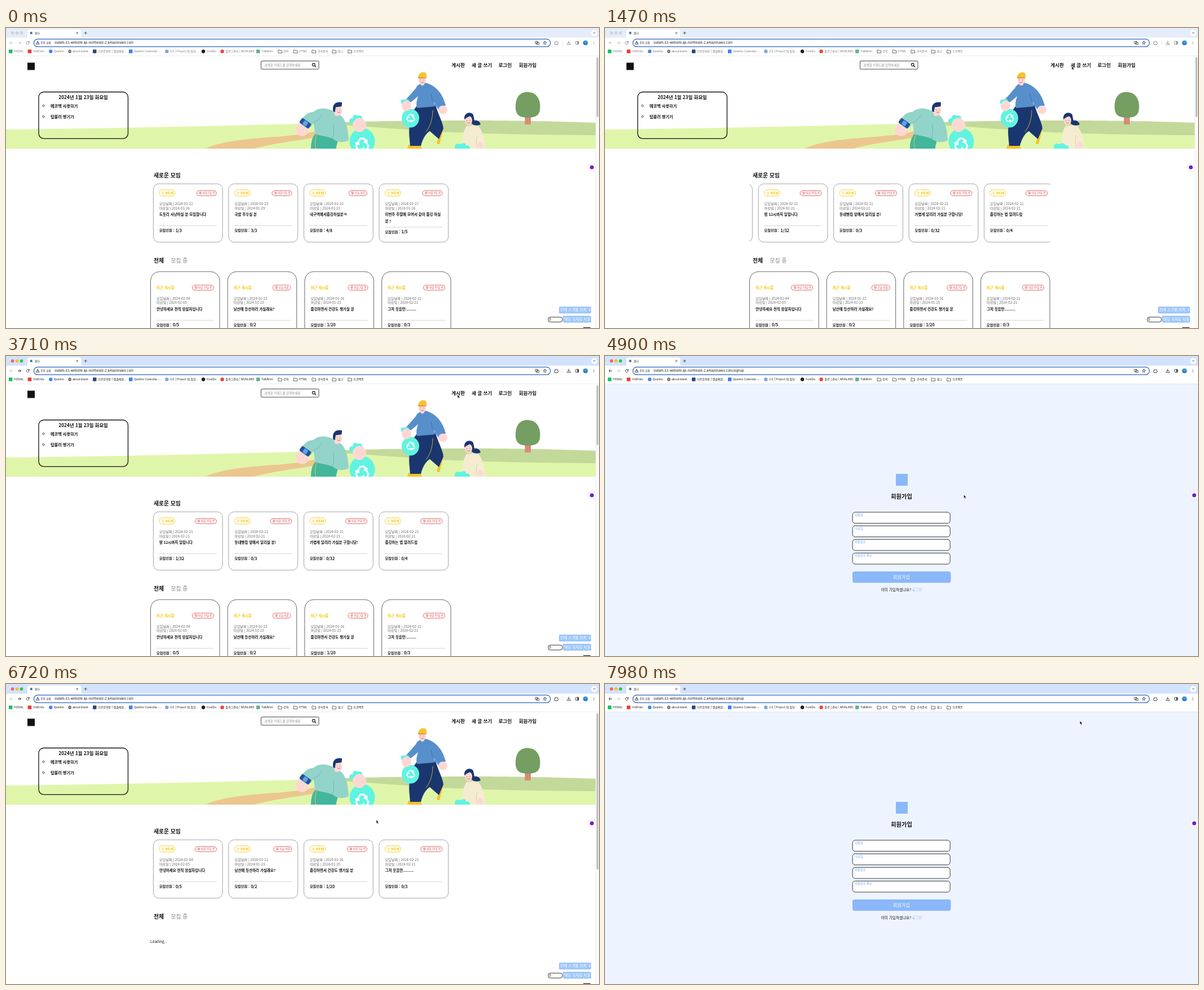
An HTML page for the animation above (8 s loop, 1052 by 532 pixels).

```html
<!DOCTYPE html>
<html lang="ko">
<head>
<meta charset="utf-8">
<title>줍다</title>
<style>
html, body { margin: 0; width: 100%; height: 100%; overflow: hidden; background: #fff; }
svg { display: block; width: 100vw; height: 100vh; }
text { font-family: "Noto Sans CJK KR", "Noto Sans CJK JP", "Noto Sans CJK", sans-serif; white-space: pre; }
text.ui { font-family: Inter, "Noto Sans CJK KR", "Noto Sans CJK JP", "Noto Sans CJK", sans-serif; }
</style>
</head>
<body>
<svg id="stage" viewBox="0 0 1052 532" xmlns="http://www.w3.org/2000/svg"></svg>
<script>
const LOOP = 8000, STEP = 70;
const YELLOW = '#f6c915', RED = '#d8403f', SKY = '#8ab8f8', CYAN = '#61f3e1', SKIN = '#fdd8d3', NAVY = '#1a366f';

// ---- markup helpers; text is placed by its vertical middle
const text = (x, y, s, size, fill = '#111', weight = 400, extra = '') =>
  `<text x="${x}" y="${y + size * 0.365}" font-size="${size}" fill="${fill}" font-weight="${weight}" ${extra}>${s}</text>`;
const ui = (x, y, s, size, fill) => text(x, y, s, size, fill, 400, 'class="ui"');
const rect = (x, y, w, h, r, fill, stroke = 'none', sw = 1) =>
  `<rect x="${x}" y="${y}" width="${w}" height="${h}" rx="${r}" fill="${fill}" stroke="${stroke}" stroke-width="${sw}"/>`;
const dot = (x, y, r, fill, extra = '') => `<circle cx="${x}" cy="${y}" r="${r}" fill="${fill}" ${extra}/>`;
const oval = (x, y, rx, ry, fill) => `<ellipse cx="${x}" cy="${y}" rx="${rx}" ry="${ry}" fill="${fill}"/>`;
const shape = (d, fill) => `<path d="${d}" fill="${fill}"/>`;
const line = (d, stroke = '#222', w = 0.9, extra = '') =>
  `<path d="${d}" fill="none" stroke="${stroke}" stroke-width="${w}" stroke-linecap="round" stroke-linejoin="round" ${extra}/>`;
const group = (inner, attrs = '') => `<g ${attrs}>${inner}</g>`;

// ---- meeting cards: deadline, meeting date, closing date, title lines, people
const FEB = ['마감 29일 전', '2024-02-21', '2024-02-21'];
const recent = [
  ['마감 13일 전', '2024-02-04', '2024-02-05', '안녕하세요 전직 암살자입니다', '0/5'],
  ['오늘 마감', '2024-01-22', '2024-01-23', '남산에 등산하러 가실래요?', '0/2'],
  ['마감 2일 전', '2024-01-26', '2024-01-25', '줍깅하면서 건강도 챙기실 분', '1/20'],
  [...FEB, '그저 웃음만.........', '0/3']
];
const fresh = [
  ['마감 2일 전', '2024-01-22', '2024-01-26', '도토리 사냥하실 분 모집합니다', '1/3'],
  ['마감 6일 전', '2024-01-25', '2024-01-29', '국밥 주우실 분', '3/3'],
  ['오늘 마감', '2024-01-23', '2024-01-23', '내구역에서줍깅하실분ㅋ', '4/8'],
  ['마감 3일 전', '2024-01-27', '2024-01-26', '이번주 주말에 모여서 같이 줍깅 하실|분 !', '1/5'],
  [...FEB, '밤 12시까지 달립니다', '1/32'],
  [...FEB, '동네빵집 앞에서 달리실 분!', '0/3'],
  [...FEB, '가볍게 달리러 가실분 구합니당!', '0/32'],
  [...FEB, '줍깅하는 법 알려드림', '0/4']
];
const pillWidth = { 5: 32, 7: 35, 8: 38 };

function cardBody([due, date, close, title, people]) {
  const w = pillWidth[due.length], left = 112 - w;
  const lines = title.split('|'), drop = lines.length > 1 ? 2.5 : 0;
  return rect(left, 12, w, 9, 4.5, '#fff', RED, 0.8) +
    dot(left + 6.5, 16.7, 1.5, 'none', `stroke="${RED}" stroke-width=".9"`) +
    line(`M${left + 4.6} 14.6l.8 -.7M${left + 8.4} 14.6l-.8 -.7`, RED, 0.7) +
    text(left + 10.3, 16.5, due, 4.65, RED, 500) +
    text(10.5, 35.3, '모임날짜 | ' + date, 6.2, '#666') +
    text(10.5, 43, '마감일 | ' + close, 6.2, '#666') +
    lines.map((s, i) => text(10.5, 54.8 + i * 11.2, s, 6.5, '#111', 700)).join('') +
    line(`M10.5 ${74.3 + drop}H112`, '#c9c9c9', 0.8) +
    text(10.5, 82.7 + drop, '모집인원 :', 6.2, '#111', 700) +
    text(39.5, 82.7 + drop, people, 7, '#111', 700);
}

const newPill = rect(10.5, 10.7, 28, 11, 5.5, '#fff', YELLOW, 0.9) +
  dot(16.8, 15.6, 1.6, 'none', `stroke="${YELLOW}" stroke-width=".7"`) +
  line('M16.2 18.3h1.2', YELLOW, 0.8) + text(21.2, 16.3, 'NEW', 6.5, YELLOW, 700);
const newCard = (c, i) => group(
  rect(0, 0, 122.8, 103.5, 10, '#fff', '#a3a3a3') + newPill + cardBody(c),
  `transform="translate(${261.4 + i * 133.5} 276.3)"`);
const recentCard = (c, i) => group(
  rect(0, -12, 122.5, 140, 16, '#fff', '#666') + text(10.5, 16.3, '최근 게시물', 6.5, YELLOW, 700) + cardBody(c),
  `transform="translate(${256.5 + i * 136.7} 444)"`);

// ---- illustration
const recycle = (x, y, k) => group([0, 120, 240].map(a => group(
  line('M-4.6 -.2L-1.4 -5H1.4L2.8 -2.8', '#fff', 1.3) + shape('M4.3 -4.4L4 -.6L.6 -2.2Z', '#fff'),
  `transform="rotate(${a})"`)).join(''), `transform="translate(${x} ${y}) scale(${k})"`);
const face = (x, y) => dot(x - 2.5, y, 0.6, '#333') + dot(x + 3, y, 0.6, '#333') +
  line(`M${x - 2} ${y + 4}q2.5 2.2 4.5 0`, '#c0392b', 0.8);
const knot = points => points.map(([x, y, r]) => dot(x, y, r, CYAN)).join('');

const hills = shape('M440 176C560 165 700 164 830 164C920 164 990 166 1046 168V214H440Z', '#c3d99a') +
  shape('M0 180C180 178 360 174 520 170C620 170 720 184 850 187C920 189 990 190 1046 190V214H0Z', '#dff6aa') +
  shape('M353 214C395 196 450 196 500 191C522 189 540 186 556 181L566 191C540 197 480 203 440 214Z', '#ecc68f');
const tree = rect(920.5, 154, 10.5, 17, 0, '#d98a76') +
  shape('M904 140C904 122 912 113.5 925 113.5C938 113.5 947.5 122 947.5 140C947.5 153 942 159 926 159C910 159 904 153 904 140Z', '#759e62');
const bender =
  shape('M541 214C541 196 547 184 560 183L588 191C591 201 585 208 586 214Z', '#43b69c') +
  line('M550 214C547 204 548 196 552 188', '#e7c65a', 1) +
  shape('M545 149C556 140 570 141 584 149C600 155 607 172 608 199C596 205 587 202 579 196C570 192 560 192 549 188C546 180 548 174 545 168L540 177L524 163C529 155 536 149 545 149Z', '#92d4c9') +
  line('M545 168C552 165 557 160 560 155M579 196C582 186 582 178 580 170', '#5faea2', 0.7) +
  oval(525.5, 180, 11.5, 11.5, SKIN) +
  group(rect(-10, -5, 20, 10, 2, '#24509b') + rect(-4, -4, 8, 8, 2, '#58a7e8'), 'transform="translate(531 169) rotate(35)"') +
  rect(583, 147, 9, 9, 3, SKIN) + oval(588.8, 146, 7.6, 9.5, SKIN) +
  shape('M580.5 148C578 135 585 130 596 132L595.5 139L585 140.5L583.5 149Z', NAVY) + face(590, 145) +
  knot([[614, 165, 5], [620, 159, 5], [627, 160, 5]]) + oval(632, 201, 22.5, 23.5, CYAN) +
  oval(627, 172, 12, 12.5, SKIN) + recycle(632, 207, 2.2);
const walker =
  shape('M771 177L776 180L769 206L764 205Z', '#f6c22b') + shape('M714 207L734 205L738 214H712Z', '#f6c22b') +
  shape('M716 174C716 158 722 146 729 138L762 136C766 152 775 167 776 178L768 197L752 183C745 186 739 197 736 209L717 209C716 196 714 184 716 174Z', NAVY) +
  line('M757 146C757 162 752 176 745 184', '#f6c22b', 0.8) +
  shape('M727 107C731 98 742 95 750 99C765 105 775 118 780 137L768 146L758 130L762 139L729 142C727 134 729 128 731 121L718 132L710 126C718 118 722 112 727 107Z', '#578fcb') +
  line('M757 130C755 124 755 120 754 117', '#2f65a5', 0.7) +
  oval(775, 145, 8, 7.5, SKIN) + knot([[705, 131, 4.5], [711, 130, 4]]) +
  oval(717.5, 160, 15.5, 16.5, CYAN) + oval(710.5, 138, 8.5, 9.5, SKIN) + recycle(718, 160, 1.35) +
  rect(735, 94, 7, 8, 3, SKIN) + oval(738.5, 92.5, 6.8, 7.8, SKIN) +
  shape('M731 91C730 81 738 76 745 80L747 87L731 89Z', '#f6c22b') + line('M732 88.5H745', '#de7d36', 1.6) + face(738, 92);
const girl =
  shape('M806 214C812 196 809 184 817 174L836 172C846 181 850 199 850 214Z', '#f4ebd0') +
  line('M836 190C834 198 834 206 836 214', '#d9cba3', 0.7) +
  shape('M813.5 162C811 150 825 147 829 154L831 164C836 163 841 166 842 171C836 174 829 173 826 169Z', NAVY) +
  oval(820.5, 164, 6.6, 8.6, SKIN) + shape('M813.5 162C812 150 826 148 829 156C823 156 819 157 813.5 162Z', NAVY) + face(820, 164) +
  oval(842, 208, 5, 6, SKIN) + knot([[802, 211, 6], [811, 210, 6], [818, 213, 5]]);

// ---- pages
const home = rect(0, 50, 1052, 482, 0, '#fff') +
  group(hills + tree + bender + walker + girl, 'clip-path="url(#banner)"') +
  rect(38, 61.5, 13, 13, 0, '#111') +
  rect(452.5, 58.5, 102.5, 14.5, 1.5, '#fff', '#333', 0.9) + text(458.5, 65.8, '검색할 키워드를 입력하세요..', 5.5, '#888') +
  dot(545.8, 65, 2.4, 'none', 'stroke="#111" stroke-width="1.1"') + line('M547.7 67L549.8 69.2', '#111', 1.2) +
  [[790.5, '게시판'], [826.3, '새 글 쓰기'], [873.8, '로그인'], [909.8, '회원가입']].map(([x, s]) => text(x, 65.5, s, 8.5, '#111', 700)).join('') +
  rect(58, 113.5, 158.5, 82.7, 9, 'none', '#111', 1.3) +
  text(137, 122.7, '2024년 1월 23일 화요일', 8.35, '#111', 700, 'text-anchor="middle"') +
  [[138.3, '에코백 사용하기'], [157.5, '텀블러 챙기기']].map(([y, s]) =>
    dot(66.5, y - 0.5, 1.7, '#fff', 'stroke="#222" stroke-width=".8"') + text(79, y, s, 7.2, '#111', 700)).join('') +
  text(262, 261, '새로운 모임', 9.8, '#111', 700) +
  group(group(fresh.map(newCard).join(''), 'id="slides"') + group(recent.map(newCard).join(''), 'id="firstSlide"'), 'clip-path="url(#carousel)"') +
  text(262, 412.3, '전체', 9.8, '#111', 700) + text(292.5, 412.3, '모집 중', 9.8, '#888', 500) +
  group(recent.map(recentCard).join(''), 'id="list"') +
  text(256, 456.6, 'Loading...', 6.6, '#111', 500, 'id="loading"') +
  rect(981, 494, 57, 12.3, 2, '#9dc6f7') + text(983.3, 500, '현재 스크롤 위치: 0', 6.65, '#fff') +
  rect(961.7, 512.7, 25.6, 8.6, 4, '#fff', '#222', 0.9) + text(963.5, 517, '0', 5.8) +
  rect(988.2, 510.3, 49.8, 12.3, 2, '#9dc6f7') + text(990.3, 516.5, '해당 위치로 이동', 6.65, '#fff') +
  rect(1024, 530.7, 13, 1.3, 0, '#333');

const fields = ['이메일', '닉네임', '비밀번호', '비밀번호 확인'];
const signup = rect(0, 49, 1052, 483, 0, '#eef4ff') +
  rect(516, 209, 21, 21, 0, SKY) +
  text(526, 249.3, '회원가입', 10.3, '#111', 700, 'text-anchor="middle"') +
  fields.map((s, i) => rect(439.2, 277 + i * 24.15, 173, 19.6, 4.5, '#fff', '#222', 0.9) + text(443, 281.8 + i * 24.15, s, 5.3, '#74a9ee')).join('') +
  rect(439, 382, 174.5, 20.3, 4, SKY) + text(526, 391.7, '회원가입', 8.1, '#fff', 400, 'text-anchor="middle"') +
  text(489.8, 414.5, '이미 가입하셨나요?', 6.6, '#111', 500) + text(544.8, 414.5, '로그인', 6.3, SKY);

const scrollbar = rect(1046.5, 50, 5.5, 482, 0, '#fafafa') + line('M1046.5 50V532', '#e6e6e6', 0.6) +
  `<rect id="thumb" x="1047.6" y="52" width="3.4" rx="1.7" fill="#c1c1c1"/>`;
const bubble = rect(1038, 240, 24, 14, 7, '#fff', '#e3e3ea', 0.8) + dot(1045.3, 247, 3.5, '#6a22cc');

// ---- browser window
const marks = [
  [5, 14, 'HODAL', '#13c35b', 0], [38.7, 48, 'VidOrbo', '#f03a2e', 0], [76, 84.7, 'Quelmo', '#4285f4', 1],
  [110, 118, 'about:blank', 'globe'], [154, 163, '다온강좌방 | 별솔배움...', '#28477e', 0],
  [218, 227, 'Quelmo Calendar -...', '#3f7ff0', 0], [282, 291, '2기 | Project 팀 빌딩...', '#7fa9dc', 1],
  [346.8, 356, 'ForkDu', '#1b1f23', 1], [380.3, 389.3, '블로그관리 | MUNJIBO', '#ef4237', 1],
  [444, 453, 'TalkBrim', '#62b09b', 0], [483, 492, '강의', 'folder'], [510.3, 520, 'HTML', 'folder'],
  [543, 553, '공식문서', 'folder'], [579, 589, '참고', 'folder'], [606.8, 616.3, '프로젝트', 'folder']
];
function markIcon(x, kind, round) {
  if (kind === 'folder') return line(`M${x + .3} 39h2.2l.9 1h3.2v4.3h-6.3Z`, '#444', 0.8);
  if (kind === 'globe') return dot(x + 3.2, 41.5, 2.9, '#555') + line(`M${x + 1} 40.5h4.4M${x + 1} 42.6h4.4`, '#fff', 0.6);
  return round ? dot(x + 3.3, 41.5, 3.2, kind) : rect(x, 38.3, 6.5, 6.5, 1, kind);
}
const lights = colors => colors.map((c, i) => dot(11.5 + i * 8, 8.8, 2.8, c)).join('');
const frame = rect(0, 0, 1052, 18, 0, '#e6edfa') +
  group(rect(0, 0, 1052, 18, 0, '#d3e3fd'), 'class="focus"') +
  shape('M35 18C37.5 18 38 16.5 38 14.5V6C38 3.8 39.5 2.5 41.5 2.5H130C132 2.5 133.3 3.8 133.3 6V14.5C133.3 16.5 134 18 136.5 18Z', '#fff') +
  rect(0, 17.2, 1052, 32, 0, '#fff') + line('M0 49.4H1052', '#dfe3ea', 0.7) +
  lights(['#cbd2de', '#cbd2de', '#cbd2de']) + group(lights(['#fe5f57', '#febc2e', '#28c840']), 'class="focus"') +
  rect(43, 6.8, 3.6, 4, 0, '#4a6d99') + ui(51, 8.8, '줍다', 5, '#333') +
  line('M125 7.3l3 3M128 7.3l-3 3M139 8.8h4.4M141.2 6.6v4.4', '#333', 0.8) +
  dot(1043.5, 8.8, 5.3, '#fff') + line('M1041.9 8l1.6 1.6l1.6 -1.6', '#333', 0.9) +
  line('M12 26.3H7.2M9.3 24.1L7 26.3L9.3 28.5', '#222', 0.9, 'id="back"') +
  line('M21.4 26.3H26.2M24.1 24.1L26.4 26.3L24.1 28.5', '#222', 0.9, 'id="forward"') +
  rect(49.4, 19.6, 916.4, 13.6, 6.8, '#fff', '#2b62c4', 1.2) +
  line('M56.3 23.8L59 28.5H53.6ZM56.3 25.4v1.4', '#222', 0.8) + ui(61.3, 26.3, '주의 요함', 4.7, '#222') +
  ui(86, 26.3, '<tspan id="url"></tspan>', 5.75, '#1f1f1f') +
  line('M939.4 23.6h3.6v4h-3.6ZM942 25.2h3.6v4h-3.6Z', '#333', 0.8) +
  line('M956 23.3l.9 2l2.1 .2l-1.6 1.4l.5 2.1l-1.9 -1.1l-1.9 1.1l.5 -2.1l-1.6 -1.4l2.1 -.2Z', '#333', 0.8) +
  marks.map(([x, , , kind, round]) => markIcon(x, kind, round)).join('') +
  group(
    line('M974 24.6h1.6a1 1 0 0 1 2 0h1.3v1.7a1 1 0 0 1 0 2v1.3h-4.9Z', '#333', 0.9) +
    line('M998.3 23.2v4M996.5 25.6l1.8 1.8l1.8 -1.8M995.5 27.7v1.6h5.6v-1.6', '#333', 0.9) +
    rect(1010.6, 23.8, 5.2, 5, 0.6, 'none', '#333', 0.9) + rect(1013.5, 23.8, 2.4, 5, 0, '#333') +
    [24.3, 26.4, 28.5].map(y => dot(1042.8, y, 0.6, '#333')).join('') +
    marks.map(([, x, s]) => ui(x, 41.5, s, 5.05, '#1f1f1f')).join(''), 'id="tools"') +
  line('M987.3 23.5v5.4', '#c9d8f2', 0.8) +
  line('M41 25.2A2.5 2.5 0 1 0 41.1 27.2M41.2 23.7v1.7h-1.7', '#333', 0.9, 'id="reload"') +
  dot(1028, 26.4, 4.1, '#1b7fc4') + text(1028, 26.4, '가온', 3, '#fff', 400, 'text-anchor="middle"');

const stage = document.getElementById('stage');
stage.innerHTML = `<defs>
  <clipPath id="banner"><rect y="50" width="1046" height="164"/></clipPath>
  <clipPath id="carousel"><rect x="256" y="270" width="534" height="116"/></clipPath></defs>` +
  group(home, 'id="home"') + group(signup, 'id="signup"') + group(bubble, 'id="bubble"') +
  group(scrollbar, 'id="scrollbar"') + frame +
  `<path id="cursor" d="M0 0V6.2L1.4 4.9L2.4 7.2L3.5 6.7L2.5 4.5H4.4Z" fill="#111" stroke="#fff" stroke-width=".45"/>`;

// ---- motion
const $ = id => document.getElementById(id);
const focusParts = document.querySelectorAll('.focus');
const show = (id, on) => $(id).setAttribute('visibility', on ? 'inherit' : 'hidden');
const clamp = v => Math.min(1, Math.max(0, v));

// CSS "ease" timing curve, solved for x by bisection
function ease(x) {
  const bez = (a, b, u) => 3 * a * u * (1 - u) ** 2 + 3 * b * u * u * (1 - u) + u ** 3;
  let lo = 0, hi = 1;
  for (let i = 0; i < 24; i++) {
    const mid = (lo + hi) / 2;
    if (bez(0.25, 0.25, mid) < x) lo = mid; else hi = mid;
  }
  return bez(0.1, 1, lo);
}

// pointer stops: time, x, y
const stops = [
  [350, 605, 362], [420, 669, 274.5], [560, 669, 274.5], [910, 770, 164], [1400, 828, 68], [1470, 828, 67.7],
  [1680, 802, 68], [1820, 801, 68], [2030, 801, 68], [2240, 801, 66], [2870, 801, 66], [3080, 802.5, 68.5],
  [3290, 801, 68.2], [3990, 801, 68.2], [4410, 473, 275.5], [4480, 473, 275.5], [4900, 636.5, 246],
  [5600, 636.5, 246], [6020, 556, 440], [6250, 670, 300], [6440, 656.5, 241], [6510, 657, 241],
  [6860, 657, 241], [7700, 842.5, 65.5]
];
function pointer(t) {
  const i = stops.findIndex(s => s[0] > t);
  if (i < 0) return stops[stops.length - 1].slice(1);
  const [t0, x0, y0] = stops[i - 1], [t1, x1, y1] = stops[i];
  let k = (t - t0) / (t1 - t0);
  if (t > 3900) k = k * k * (3 - 2 * k);
  return [x0 + (x1 - x0) * k, y0 + (y1 - y0) * k];
}

function render(t) {
  const onSignup = t >= 3780 && t < 6650 || t >= 7840;
  const returned = t >= 6650, loading = returned && t < 6790;
  const focus = clamp((t - 2310) / 210);

  show('home', !onSignup);
  show('signup', onSignup);
  show('scrollbar', !onSignup);
  show('slides', !onSignup && !returned);
  show('firstSlide', !onSignup && returned);
  show('list', !onSignup && !loading);
  show('loading', !onSignup && loading);
  $('slides').setAttribute('transform', `translate(${-534 * ease(clamp((t - 588) / 1079))} 0)`);
  $('thumb').setAttribute('height', loading ? 277 : 106);
  $('bubble').setAttribute('transform', `translate(${onSignup ? 0 : -6} 0)`);

  $('url').textContent = 'ssdam.s3-website.ap-northeast-2.amazonaws.com' + (onSignup ? '/signup' : '');
  focusParts.forEach(p => p.setAttribute('opacity', focus));
  const dim = 0.6 + 0.4 * focus;
  $('tools').setAttribute('opacity', dim);
  $('reload').setAttribute('opacity', dim);
  $('back').setAttribute('opacity', onSignup ? 1 : 0.3);
  $('forward').setAttribute('opacity', onSignup ? 0.3 : 0.3 + 0.7 * focus);

  show('cursor', t >= 350);
  if (t >= 350) $('cursor').setAttribute('transform', `translate(${pointer(t).join(' ')})`);
}

function tick() {
  const t = performance.now() % LOOP;
  render(Math.floor(t / STEP) * STEP);
  requestAnimationFrame(tick);
}
tick();
</script>
</body>
</html>
```
